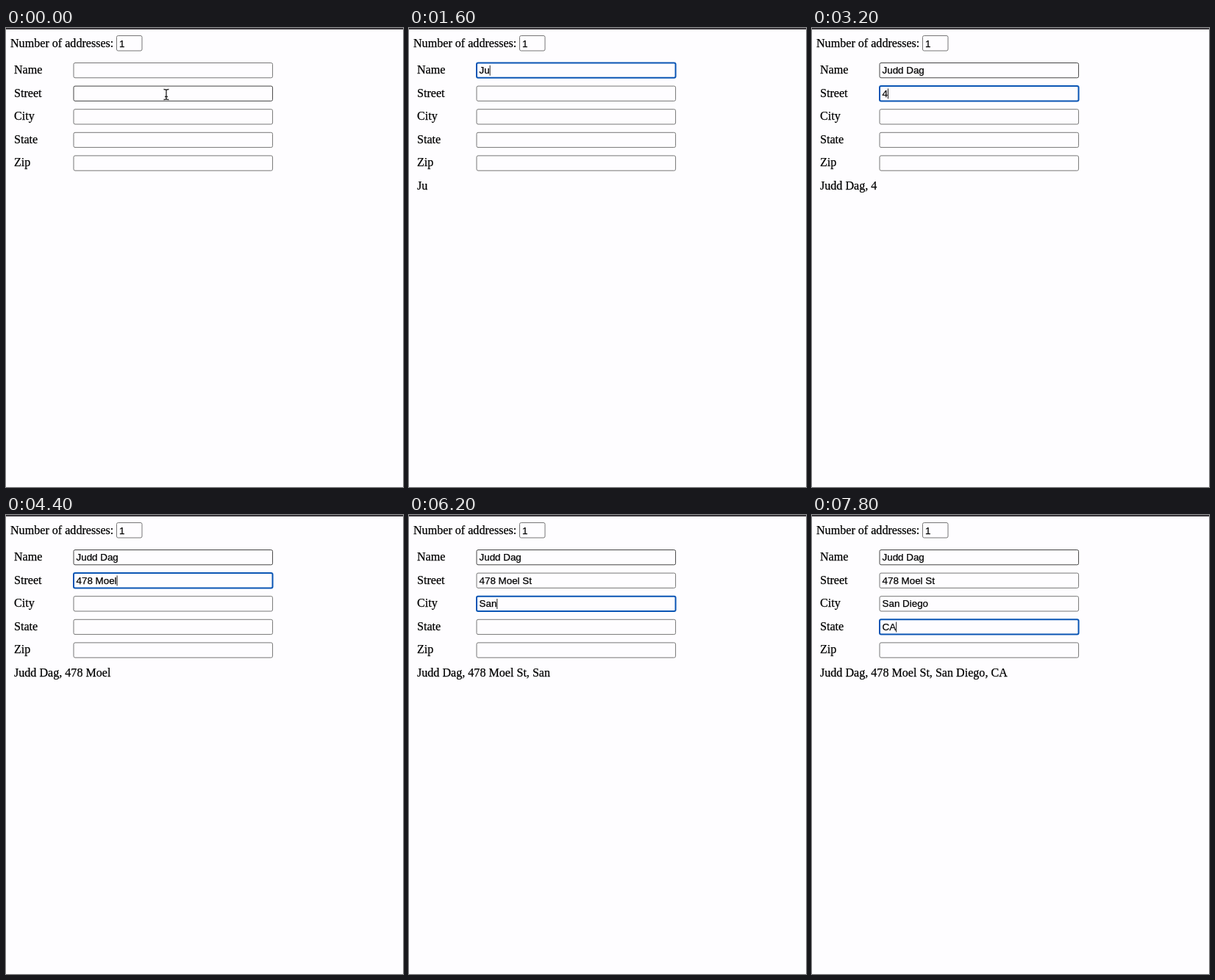
An HTML page for the animation above (8000 ms loop, 540 by 625 pixels).

```html
<!DOCTYPE html>
<html lang="en">
<head>
<meta charset="utf-8">
<title>Address form</title>
<style>
  html, body { margin: 0; width: 100%; height: 100%; overflow: hidden; background: #fefdff; }
  svg { display: block; }
  text { font: 16.1px "Liberation Serif", Times, serif; white-space: pre; stroke: #000; stroke-width: .25; }
  .value { font: 13.4px "Liberation Sans", Arial, sans-serif; }
  .box { fill: #fefdff; stroke: #767676; stroke-width: 1; }
  .box.hover { stroke: #444; }
  .box.focus { stroke: #0a55b4; stroke-width: 2; }
  #mouse { fill: none; stroke: #222; stroke-width: 1.3; }
</style>
</head>
<body>
<svg id="stage" width="540" height="625" viewBox="0 0 540 625">
  <rect width="540" height="2" fill="#38363a"/>
  <text x="6" y="25.5">Number of addresses:</text>
  <rect class="box" x="150.5" y="10.5" width="34.5" height="20.5" rx="2"/>
  <text class="value" x="154" y="25.5">1</text>
</svg>
<script>
const LOOP = 8000, TICK = 200;
const TOP = 47.5, PITCH = 31.6, HEIGHT = 20.3, BASELINE = 14.5, TEXT_X = 95.5;

// Typing runs evenly from the first character at `start` to the last at `end`
const fields = [
  { label: 'Name', text: 'Judd Dag', focus: 800, start: 1200, end: 2800 },
  { label: 'Street', text: '478 Moel St', focus: 3000, start: 3200, end: 4900 },
  { label: 'City', text: 'San Diego', focus: 5400, start: 5800, end: 7000 },
  { label: 'State', text: 'CA', focus: 7200, start: 7600, end: 7800 },
  { label: 'Zip', text: '', focus: Infinity, start: Infinity, end: Infinity }
];
const pointer = { from: [218, 90.5], to: [195.5, 65], arrives: 400 };

const stage = document.getElementById('stage');
function add(tag, attrs, text = '') {
  const node = document.createElementNS('http://www.w3.org/2000/svg', tag);
  for (const key in attrs) node.setAttribute(key, attrs[key]);
  node.textContent = text;
  return stage.appendChild(node);
}

fields.forEach((field, i) => {
  const y = field.y = TOP + i * PITCH;
  add('text', { x: 11, y: y + BASELINE }, field.label);
  field.box = add('rect', { x: 92, y, width: 270.6, height: HEIGHT, rx: 2 });
  field.value = add('text', { class: 'value', x: TEXT_X, y: y + BASELINE });
});
const summary = add('text', { x: 11, y: TOP + fields.length * PITCH + BASELINE });
const caret = add('rect', { width: 1, height: 14, fill: '#222' });
const mouse = add('path', {
  id: 'mouse',
  d: 'M-3.5-7Q0-7 0-5.5Q0-7 3.5-7M0-5.5V5.5M-3.5 7Q0 7 0 5.5Q0 7 3.5 7M-2 3H2'
});

function typedPart({ text, start, end }, t) {
  if (t < start) return '';
  const progress = Math.min(1, (t - start) / (end - start));
  return text.slice(0, Math.floor(1 + (text.length - 1) * progress));
}

function render(t) {
  const travel = Math.min(1, t / pointer.arrives);
  const [mx, my] = pointer.from.map((from, i) => from + (pointer.to[i] - from) * travel);
  const focused = fields.filter(field => t >= field.focus).pop();

  for (const field of fields) {
    const hovered = my >= field.y && my <= field.y + HEIGHT;
    const state = field === focused ? ' focus' : hovered ? ' hover' : '';
    field.box.setAttribute('class', 'box' + state);
    field.value.textContent = typedPart(field, t);
  }
  summary.textContent = fields.map(field => field.value.textContent).filter(Boolean).join(', ');

  caret.style.display = focused ? '' : 'none';
  if (focused) {
    const width = focused.value.textContent ? focused.value.getComputedTextLength() : 0;
    caret.setAttribute('x', TEXT_X + width);
    caret.setAttribute('y', focused.y + 3.3);
  }

  mouse.style.display = t < fields[0].start ? '' : 'none';
  mouse.setAttribute('transform', `translate(${mx} ${my})`);
}

function frame() {
  const t = performance.now() % LOOP;
  render(Math.floor(t / TICK) * TICK);
  requestAnimationFrame(frame);
}
frame();
</script>
</body>
</html>
```
